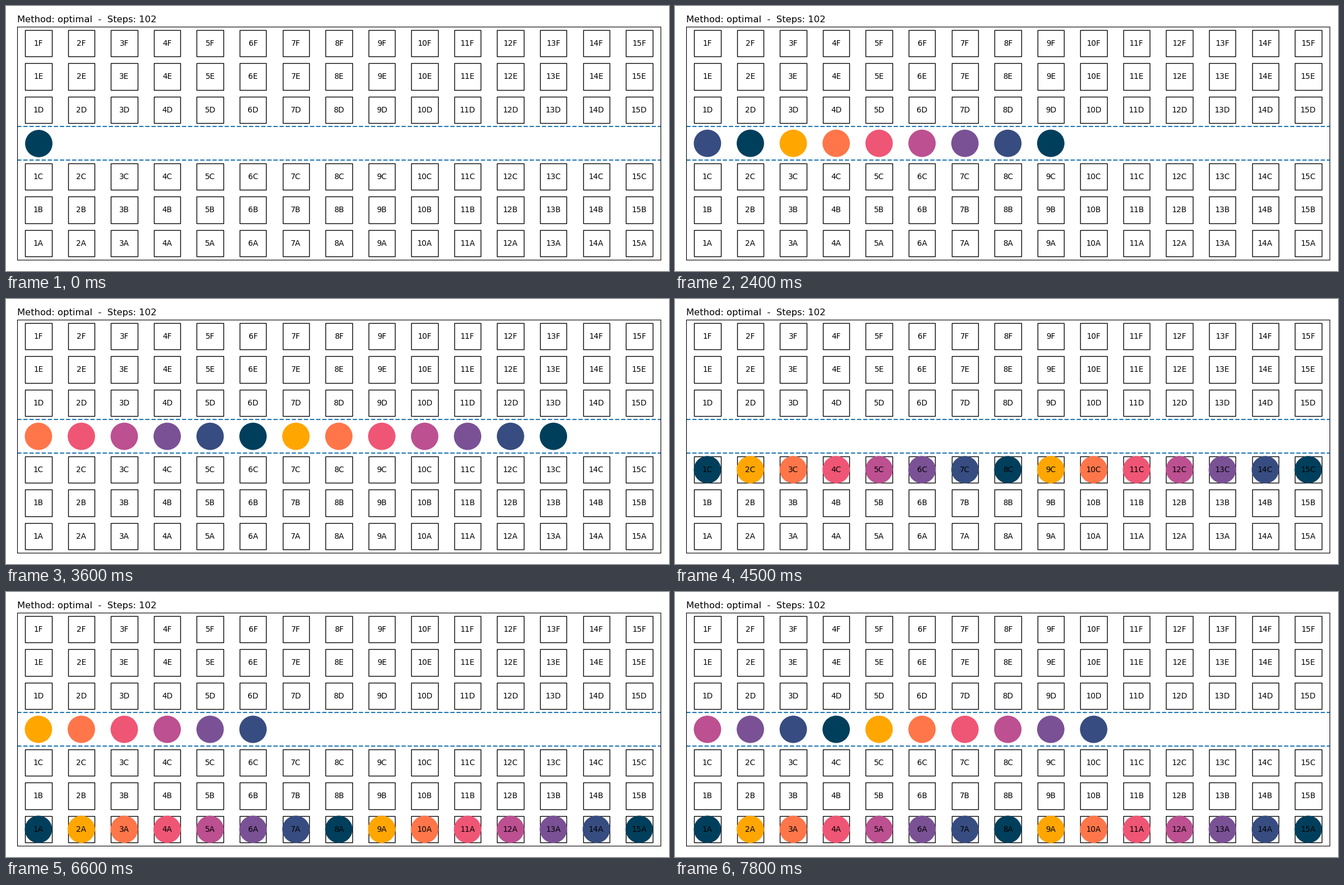
These frames come from a looping animation (1183x473 px, 8 s). A matplotlib script:

```python
import matplotlib.pyplot as plt
import numpy as np
from matplotlib.animation import FuncAnimation

WIDTH, HEIGHT, DPI = 1183, 473, 100
SCALE = WIDTH / 1200   # line, text and marker sizes suit a 1200 px stage
LEFT, RIGHT, TOP, BOTTOM = 19.6, 1168.2, 36.8, 453.4
ROWS, AISLE = 15, 3
LEVELS = {"A": 0, "B": 1, "C": 2, "D": 4, "E": 5, "F": 6}
PALETTE = ["#003f5c", "#374c80", "#7a5195", "#bc5090",
           "#ef5675", "#ff764a", "#ffa600"]
MARKER = {"s": 1200 * SCALE ** 2, "linewidths": SCALE}
TICK = 100             # ms per drawn frame
FRAMES = 80
FRAMES_PER_STEP = 3
WAVE_STEPS = ROWS + 2  # fill the aisle, then cross two seats to the window

plt.rcParams["font.family"] = "DejaVu Sans"
fig = plt.figure(figsize=(WIDTH / DPI, HEIGHT / DPI), dpi=DPI)
ax = fig.add_axes([LEFT / WIDTH, 1 - BOTTOM / HEIGHT,
                   (RIGHT - LEFT) / WIDTH, (BOTTOM - TOP) / HEIGHT])
ax.set_xlim(0.5, ROWS + 0.5)
ax.set_ylim(-0.5, 6.5)
ax.set_xticks([])
ax.set_yticks([])
ax.set_title("Method: optimal  -  Steps: 102", loc="left",
             fontsize=12 * SCALE, pad=6 * SCALE)

for letter, y in LEVELS.items():
    xs = np.arange(1, ROWS + 1)
    ax.scatter(xs, np.full(ROWS, y), marker="s",
               facecolors="none", edgecolors="black", **MARKER)
    for x in xs:
        ax.text(x, y, f"{x}{letter}", ha="center", va="center",
                fontsize=10 * SCALE)

for y in (AISLE - 0.5, AISLE + 0.5):
    ax.axhline(y, color="#1f77b4", linestyle="--", linewidth=1.5 * SCALE)

people = ax.scatter([], [], **MARKER)


def place(person, step):
    """Position of a passenger, or None before boarding."""
    wave, order = divmod(person, ROWS)
    local = step - wave * WAVE_STEPS
    if local < order:
        return None
    x = min(local - order + 1, ROWS - order)
    moved = min(max(local - (ROWS - 1), 0), 3)
    return x, AISLE - moved


def update(frame):
    step = frame // FRAMES_PER_STEP
    spots, colors = [], []
    for person in range(2 * ROWS):
        spot = place(person, step)
        if spot:
            spots.append(spot)
            colors.append(PALETTE[person % len(PALETTE)])
    people.set_offsets(spots)
    people.set_color(colors)
    return (people,)


anim = FuncAnimation(fig, update, frames=FRAMES, interval=TICK,
                     init_func=lambda: update(0), repeat=True, repeat_delay=0)
plt.show()
```
